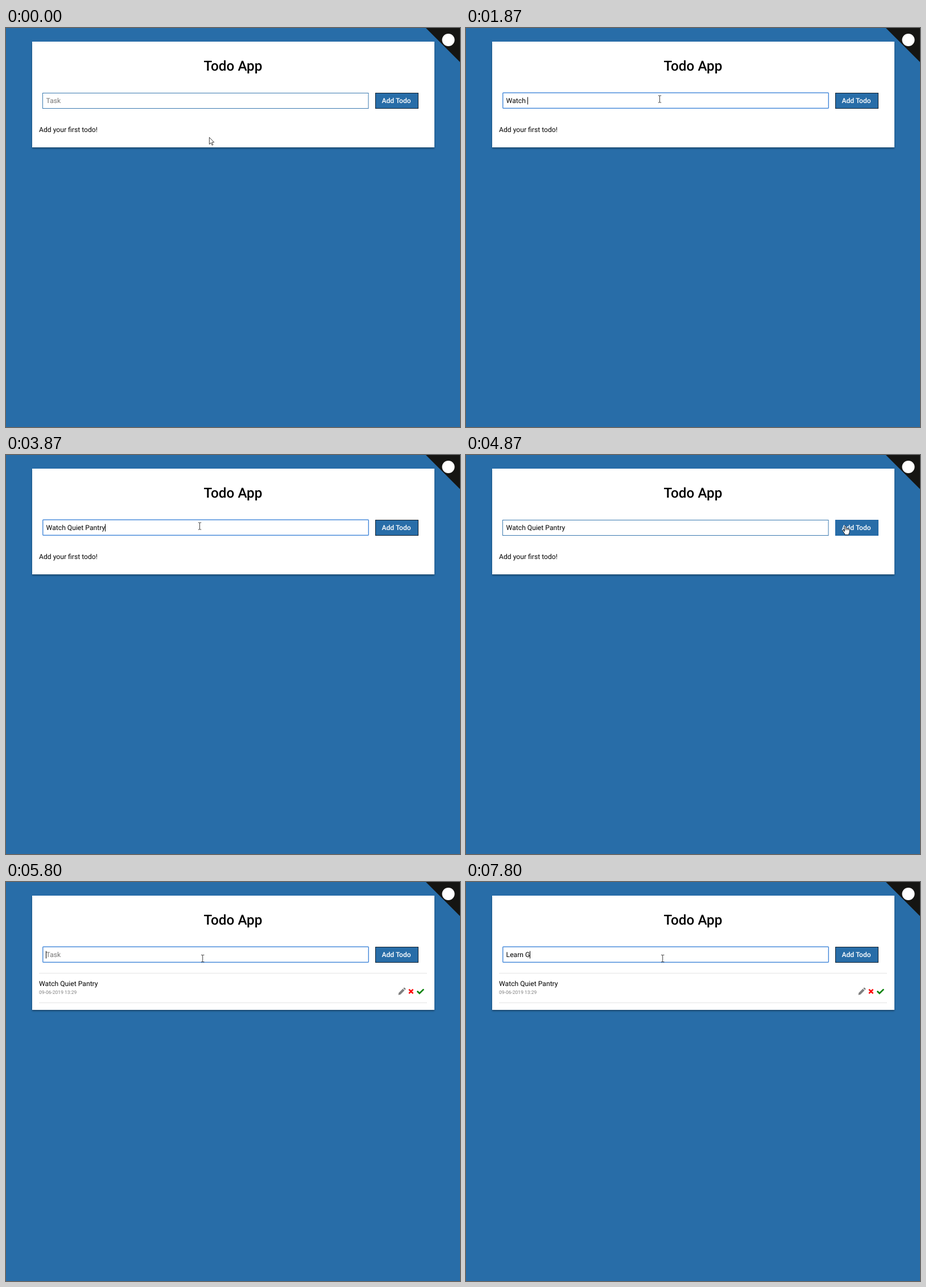
Write an HTML page that moves like this. It is 798 by 702 pixels and loops after 8 s.

```html
<!DOCTYPE html>
<html lang="en">
<head>
<meta charset="utf-8">
<title>Todo App</title>
<style>
  html, body { margin: 0; width: 100%; height: 100%; overflow: hidden; background: #286da8; }
  svg { display: block; }
  text { font: 12.16px Roboto, sans-serif; white-space: pre; text-rendering: geometricPrecision; }
  .title { font-size: 24.32px; font-weight: 500; text-anchor: middle; }
  .date { font-size: 8.51px; fill: gray; }
  .card { fill: #fff; filter: drop-shadow(0 2px 1.5px rgba(0, 0, 0, .36)); }
  .line { stroke: #e4e4e4; }
  .cursor { stroke: #000; stroke-linejoin: round; }
</style>
</head>
<body>
<svg width="798" height="702" viewBox="0 0 798 702">
  <rect class="card" id="card" x="46" y="24" width="707" height="186"/>
  <path d="M738 0H798V60Z" fill="#151513"/>
  <circle cx="777.5" cy="21" r="11" fill="#fff"/>
  <text class="title" x="399" y="74.5">Todo App</text>

  <rect id="field" fill="#fff"/>
  <text id="task" x="70.6" y="132"></text>
  <rect id="caret" y="121.5" width="1" height="13"/>
  <rect id="button" x="649.5" y="114.5" width="75" height="27" fill="#286da8"/>
  <text x="660.4" y="132" fill="#fff" style="font-weight:500">Add Todo</text>

  <text id="empty" x="58" y="182.5">Add your first todo!</text>
  <g id="item">
    <path class="line" d="M58 160.5H740M58 212.5H740"/>
    <text x="58" y="183.3">Watch Quiet Pantry</text>
    <text class="date" x="58" y="197">09-06-2019 13:29</text>
    <path fill="gray" d="M689.6 198.7l.7-3.7 7.2-7.2 3 3-7.2 7.2zM698.3 187l1-1q.8-.6 1.5 0l1.5 1.5q.6.8 0 1.5l-1 1z"/>
    <path stroke="red" stroke-width="2.6" d="M708.3 188.9l7.2 7.2M715.5 188.9l-7.2 7.2"/>
    <path fill="none" stroke="green" stroke-width="2.6" d="M722.8 192l4 4 7.4-7.4"/>
  </g>

  <g id="arrow" class="cursor">
    <path fill="#fff" transform="scale(.76)" d="M.5.5V16.5L4.2 13l2.6 5.7 2.3-1L6.6 12H11.5Z"/>
  </g>
  <g id="beam" class="cursor">
    <path fill="none" transform="scale(.76)" d="M-3.5-8H-1L0-7.5 1-8H3.5M0-7.5V7.5M-3.5 8H-1L0 7.5 1 8H3.5"/>
  </g>
  <g id="hand" class="cursor">
    <path fill="#fff" transform="scale(.76)" d="M-1.5 14V2Q-1.5.5 0 .5T1.5 2V7Q3 5.6 4.5 7.4 6 6.4 7.4 8.2 10 7.6 10 10V15Q10 17 8.5 18.500V21.500H-1V19.500L-5.500 13Q-6.500 11-5 10.500T-1.500 14ZM1.500 7V11M4.500 7.500V11M7.400 8.300V11"/>
  </g>
</svg>
<script>
const LOOP = 8000, TICK = 1000 / 15;
const FOCUS = 470, BLUR = 4870, ADDED = 4930, REFOCUS = 5800;

// Each key press: the text and the time of every letter
const first = {
  text: "Watch Quiet Pantry",
  times: [730, 1070, 1270, 1530, 1670, 1870, 2200, 2470, 2530, 2730,
          2870, 3070, 3200, 3400, 3530, 3670, 3800, 3870]
};
const second = { text: "Learn G", times: [6400, 6600, 6730, 6870, 7000, 7530, 7800] };

// Pointer moves: first tick, number of ticks, target
const moves = [[1, 3, 340.5, 125], [65, 9, 666.5, 124], [76, 8, 345.7, 134.5]];

const $ = id => document.getElementById(id);
const set = (id, attrs) => {
  for (const name in attrs) $(id).setAttribute(name, attrs[name]);
};
const show = (id, on) => set(id, { visibility: on ? "visible" : "hidden" });
const inside = (x, y, left, right) => x > left && x < right && y > 114 && y < 142;

function pointer(t) {
  const tick = Math.floor((t + 4) / TICK);
  let x = 357, y = 192;
  for (const [start, count, toX, toY] of moves) {
    const p = Math.min(1, Math.max(0, (tick - start + 1) / count));
    const ease = p * p * (3 - 2 * p);
    x += (toX - x) * ease;
    y += (toY - y) * ease;
  }
  return [x, y];
}

function draw(t) {
  const added = t >= ADDED;
  const focused = t >= FOCUS && t < BLUR || t >= REFOCUS;
  const entry = added ? second : first;
  const pressed = entry.times.filter(time => time <= t);
  const typed = entry.text.slice(0, pressed.length);

  set("card", { height: added ? 201 : 186 });
  show("empty", !added);
  show("item", added);

  set("field", focused
    ? { x: 64.75, y: 114, width: 572.5, height: 27.3, rx: 1, stroke: "#4e8edb", "stroke-width": 1.5 }
    : { x: 64.5, y: 114.5, width: 572.5, height: 27, rx: 0, stroke: "#3a79af", "stroke-width": 1 });
  set("button", { stroke: t >= BLUR && t < REFOCUS ? "#2066a4" : "#10202e" });

  $("task").textContent = typed || "Task";
  set("task", { fill: typed ? "#000" : "#757575" });

  // The caret blinks from the last key press or focus
  const since = t - (pressed.at(-1) ?? (added ? REFOCUS : FOCUS));
  const width = typed ? $("task").getComputedTextLength() : 0;
  set("caret", { x: Math.round(70.3 + width) });
  show("caret", focused && since % 1060 < 530);

  const [x, y] = pointer(t);
  const shape = inside(x, y, 649, 725) ? "hand" : inside(x, y, 64, 638) ? "beam" : "arrow";
  for (const id of ["arrow", "beam", "hand"]) show(id, id === shape);
  set(shape, { transform: `translate(${x} ${y})` });
}

function frame() {
  draw(performance.now() % LOOP);
  requestAnimationFrame(frame);
}
frame();
</script>
</body>
</html>
```
